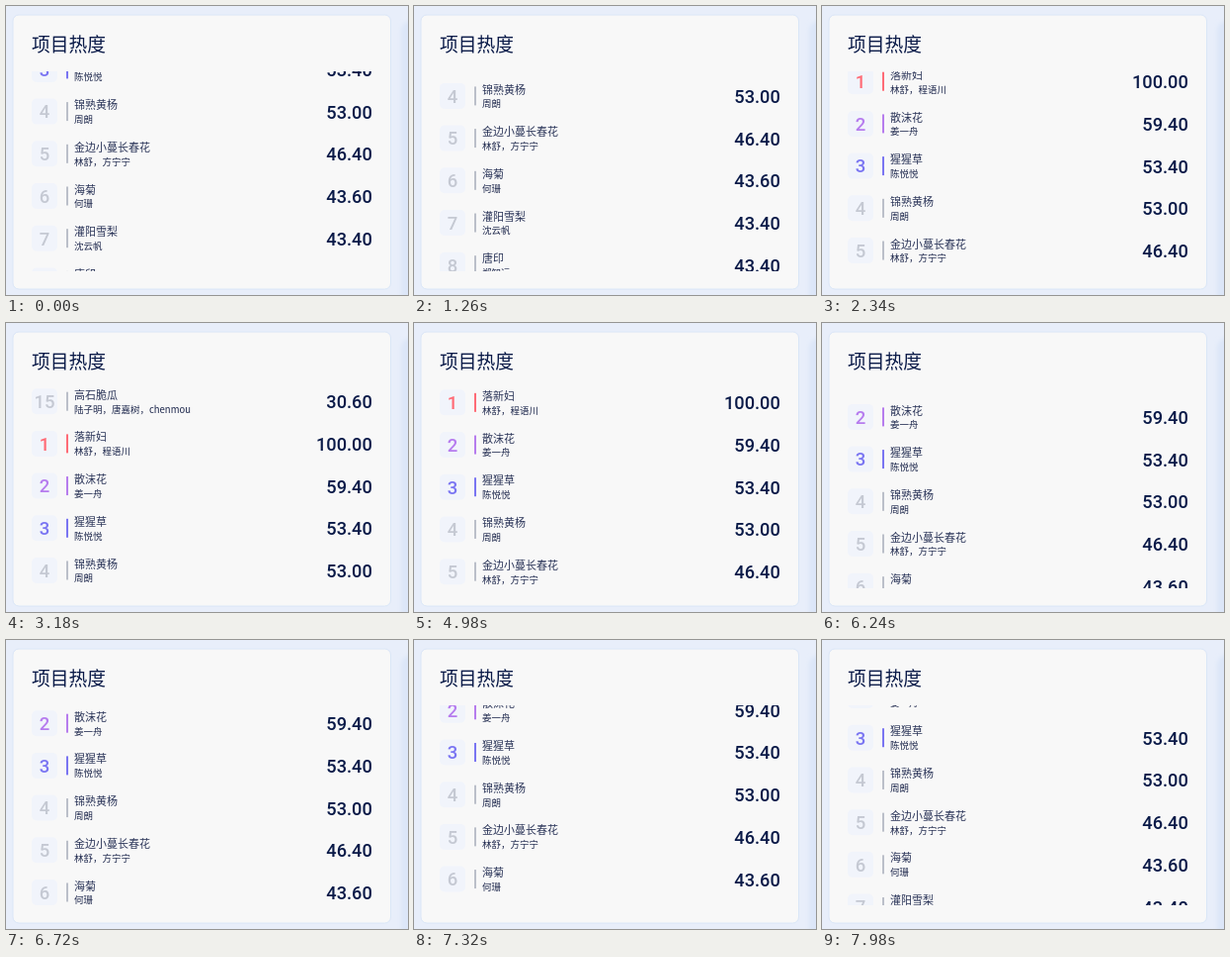
Recreate the animation shown at these times as an HTML page. Size 407 by 292 pixels, loop 8000 ms.

```html
<!DOCTYPE html>
<html lang="zh">
<head>
<meta charset="utf-8">
<title>项目热度</title>
<style>
  html, body { margin: 0; width: 100%; height: 100%; overflow: hidden; background: #e8eefa; }
  svg { display: block; width: 407px; height: 292px; }
  text { font-family: "Noto Sans CJK SC", "Noto Sans CJK", sans-serif; }
  .title { font-size: 18.75px; fill: #0a1a48; }
  .name { font-size: 11px; fill: #2a3458; }
  .people { font-size: 9.5px; font-weight: 500; fill: #1d274c; }
  .rank, .score { font-family: Roboto, "Liberation Sans", sans-serif; }
  .rank { font-size: 18.5px; font-weight: 500; text-anchor: middle; }
  .score { font-size: 18.2px; font-weight: 450; text-anchor: end; fill: #0a1a48; }
</style>
</head>
<body>
<svg viewBox="0 0 407 292">
  <defs>
    <clipPath id="view"><rect x="20" y="66" width="360" height="202"/></clipPath>
    <filter id="soft" x="-20%" y="-20%" width="140%" height="140%"><feGaussianBlur stdDeviation="2"/></filter>
  </defs>
  <rect width="407" height="292" fill="#e8eefa"/>
  <rect x="400" y="14" width="60" height="330" rx="12" fill="#dce6f8" filter="url(#soft)"/>
  <rect x="7" y="9" width="382.5" height="277" rx="6" fill="#f8f8f8" stroke="#dae6f7"/>
  <text class="title" x="26" y="46">项目热度</text>
  <g clip-path="url(#view)"><g id="list"></g></g>
</svg>
<script>
const LOOP = 8000, TICK = 60, ROW = 42.7, TOP = 80.5;
const CREEP = 1.34, NOTCH = 40.2;
const ACCENT = { 1: '#ff6b76', 2: '#b67cee', 3: '#7a75f2' };

// slot in the list, rank, name, people, score
const rows = [
  [-2, 14, '白晶菊', '赵安禾', '31.20'],
  [-1, 15, '高石脆瓜', '陆子明，唐嘉树，chenmou', '30.60'],
  [0, 1, '落新妇', '林舒，程语川', '100.00'],
  [1, 2, '散沫花', '姜一舟', '59.40'],
  [2, 3, '猩猩草', '陈悦悦', '53.40'],
  [3, 4, '锦熟黄杨', '周朗', '53.00'],
  [4, 5, '金边小蔓长春花', '林舒，方宁宁', '46.40'],
  [5, 6, '海菊', '何珊', '43.60'],
  [6, 7, '灌阳雪梨', '沈云帆', '43.40'],
  [7, 8, '唐印', '郑知远', '43.40']
];

const list = document.getElementById('list');
list.innerHTML = rows.map(([slot, rank, name, people, score]) => `
  <g transform="translate(0 ${TOP + slot * ROW})">
    <rect x="26" y="-13" width="26" height="26" rx="5" fill="#f1f4fb"/>
    <text class="rank" x="39" y="6.8" fill="${ACCENT[rank] || '#c5c9d3'}">${rank}</text>
    <rect x="61" y="-9.5" width="2" height="19" fill="${ACCENT[rank] || '#bbbfc9'}"/>
    <text class="name" x="69" y="-2.4">${name}</text>
    <text class="people" x="69" y="11.4">${people}</text>
    <text class="score" x="370.8" y="7">${score}</text>
  </g>`).join('');

// Wheel easing, sampled at step i of n
function ease(i, n) {
  const t = Math.min(1, Math.max(0, (i - 0.15) / (n - 0.15)));
  return t < 0.5 ? 4 * t ** 3 : 1 - 4 * (1 - t) ** 3;
}

// Wheel moves: start tick, ticks taken, notches
const wheel = [[20, 5, -2], [36, 7, -3], [49, 4, 1], [61, 3, 1]];

// The list creeps, is wheeled back and forth, then creeps again
function offset(tick) {
  const creep = CREEP * (Math.min(tick, 13) + Math.max(0, tick - 82));
  return wheel.reduce((s, [start, n, notches]) =>
    s + NOTCH * notches * ease(tick - start, n), 102 + creep);
}

const begin = performance.now();
function draw() {
  const tick = Math.floor(((performance.now() - begin) % LOOP) / TICK);
  list.setAttribute('transform', `translate(0 ${-offset(tick).toFixed(2)})`);
  requestAnimationFrame(draw);
}
draw();
</script>
</body>
</html>
```
